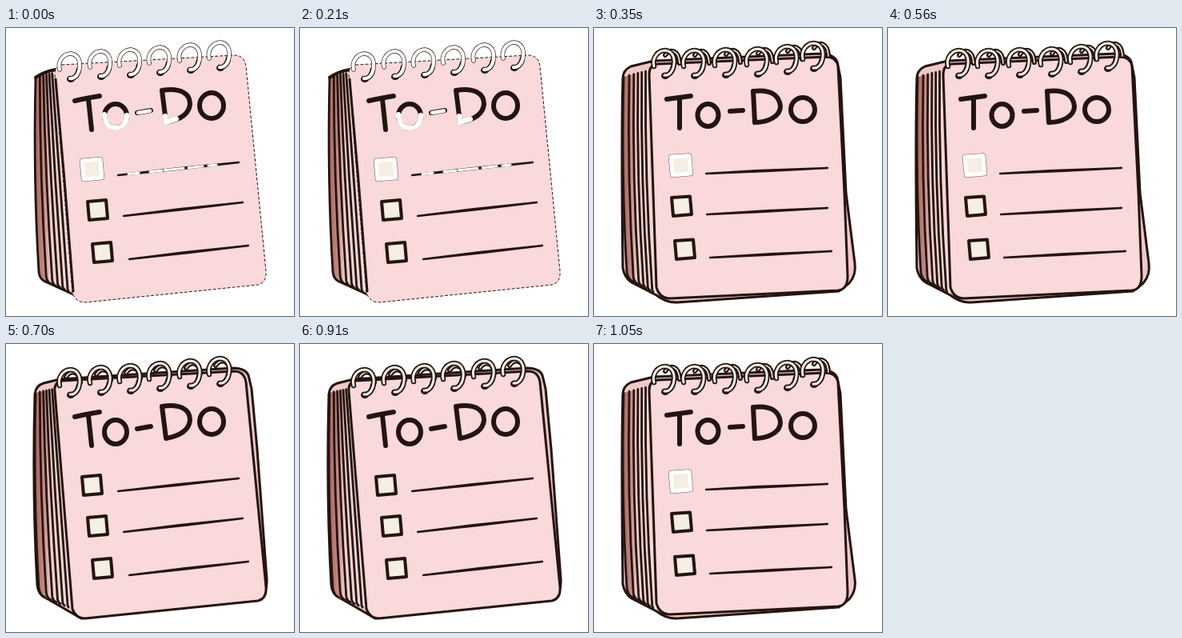
Animation, 360 px wide and 360 px high, one loop 1.4 s. Source, as an HTML page:

```html
<!DOCTYPE html>
<html lang="en">
<head>
<meta charset="utf-8">
<title>To-Do pad</title>
<style>
  html, body { margin: 0; width: 100%; height: 100%; overflow: hidden; background: #fff; }
  svg { display: block; width: 100vw; height: 100vh; }
  path, ellipse { fill: none; stroke-linecap: round; stroke-linejoin: round; }
</style>
</head>
<body>
<svg id="stage" viewBox="0 0 360 360" role="img" aria-label="To-Do">
  <defs>
    <linearGradient id="pages">
      <stop offset="0" stop-color="#a9655f"/>
      <stop offset=".25" stop-color="#c58a85"/>
      <stop offset=".42" stop-color="#f0cfcb"/>
      <stop offset="1" stop-color="#f8dcd8"/>
    </linearGradient>
  </defs>
</svg>
<script>
const INK = '#24140e', PINK = '#f9d9da', CREAM = '#f5eee2', WHITE = '#fff';
const STEP = 350, ORDER = [0, 1, 2, 1];
const stage = document.getElementById('stage');

function add(parent, tag, attrs) {
  const node = document.createElementNS('http://www.w3.org/2000/svg', tag);
  for (const key in attrs) node.setAttribute(key, attrs[key]);
  parent.append(node);
  return node;
}
const line = (g, d, width = 3, stroke = INK, fill = 'none') =>
  add(g, 'path', { d, stroke, 'stroke-width': width, style: `fill:${fill}` });

const tilted = {
  body: 'M36 63Q37 52 47 49L67 44L283 30Q299 30 303 39L307 56L314 132L326 294Q327 310 317 319L94 343L49 317Q40 313 39 301C35 230 34 140 36 63Z',
  page: 'M70 46L285 34Q298 34 300 48L325 304Q326 318 315 321L99 343Q87 343 83 331L61 59Q60 48 70 46Z',
  edge: [61, 56, 72, 190, 83, 331],
  rings: [[79, 46], [117, 43], [154, 41], [191, 38], [229, 35], [266, 32]],
  wire: [4, 1],
  letters: ['M86 91Q99 88 117 85', 'M103 89L107 127', 'M164 106L181 103',
            'M195 78L200 118M195 78C218 74 230 82 230 95C229 108 216 115 200 118'],
  os: [[137, 110, 14, 15], [257, 97, 15, 16]],
  boxes: [[95, 166], [102, 217], [108, 270]], boxTilt: -2,
  rules: [[140, 184, 291, 168], [147, 235, 296, 218], [154, 289, 303, 272]]
};
const upright = {
  body: 'M36 63Q36 53 46 48L75 41L284 32Q300 33 304 42L308 62L315 206L326 294Q328 309 319 319L306 329L104 343Q91 344 78 334L47 318Q38 312 36 300C35 220 34 140 36 63Z',
  page: 'M80 45L290 36Q303 36 305 48L313 206L317 310Q317 327 305 328L95 338Q82 338 78 324L69 58Q69 46 80 45Z',
  edge: [69, 53, 68, 190, 78, 332],
  rings: [[87, 42], [124, 42], [163, 41], [203, 40], [240, 37], [273, 33]],
  wire: [10, -2],
  letters: ['M91 89Q106 87 121 85', 'M107 88L107 125', 'M170 104L186 103',
            'M199 79L201 118M199 79C222 76 232 85 233 98C233 110 218 118 201 118'],
  os: [[142.5, 109, 13, 14], [261, 102, 15, 15]],
  boxes: [[96, 161], [97, 212], [101, 266]], boxTilt: -1.5,
  rules: [[140, 182, 292, 175], [141, 233, 292, 225], [145, 287, 297, 279]]
};

function drawStack(g, pose) {
  const [x0, y0, x1, y1, x2, y2] = pose.edge;
  const mix = (a, b, k) => a + (b - a) * k;
  const leaf = k => `M${mix(37, x0, k)} ${mix(61, y0, k)}` +
    `Q${mix(34, x1, k)} ${mix(190, y1, k)} ${mix(41, x2, k)} ${mix(305, y2, k)}` +
    `q1 ${9 * (1 - k)} ${8 * (1 - k)} ${12 * (1 - k)}`;
  add(g, 'path', { d: `${leaf(0)}L${x2} ${y2}Q${x1} ${y1} ${x0} ${y0}Z`, style: 'fill:url(#pages)' });
  for (const k of [0, .22, .4, .56, .71, .86]) line(g, leaf(k), 2.8);
}

function drawRing(g, [x, y], [wireX, wireY], faded) {
  const ring = add(g, 'g', { transform: `translate(${x} ${y})` });
  const arch = 'M-12 6C-15 -6 -6 -14 2 -14C11 -13 14 -5 13 3C12 12 7 18 1 17';
  add(ring, 'ellipse', { cx: 2, cy: 18, rx: 5, ry: 4, style: `fill:${INK}` });
  if (!faded) {
    const wire = `M${wireX - 8} ${wireY - 6}C${wireX - 2} ${wireY - 15} ${wireX + 9} ${wireY - 13} ${wireX + 10} 2`;
    line(ring, wire, 6);
    line(ring, wire, 1.6, CREAM);
  }
  line(ring, 'M12 6C11 13 6 18 1 17', 6.5);
  line(ring, arch, faded ? 5.5 : 6.5);
  line(ring, arch, faded ? 4.2 : 3, faded ? WHITE : CREAM);
}

function drawBox(g, [x, y], tilt, faded) {
  const d = `M${x} ${y}L${x + 23} ${y + tilt}L${x + 25} ${y + 21}L${x + 2} ${y + 23}Z`;
  if (faded) line(g, d, 6, '#66544c');
  line(g, d, faded ? 5 : 4, faded ? WHITE : INK, CREAM);
}

function drawRule(g, [x0, y0, x1, y1]) {
  const mx = (x0 + x1) / 2, my = (y0 + y1) / 2;
  line(g, `M${x0} ${y0}Q${mx} ${my - 1.5} ${x1} ${y1}Q${mx} ${my + 1} ${x0} ${y0}Z`, 2.3, INK, INK);
}

function drawPad(pose, { worn = false, paleBox = false } = {}) {
  const g = add(stage, 'g', { visibility: 'hidden' });
  if (!worn) line(g, pose.body, 3, INK, '#efc9c8');
  drawStack(g, pose);
  if (worn) {
    line(g, 'M37 62Q46 55 62 52', 4);
    line(g, 'M49 317L84 333', 3);
  }
  const page = line(g, pose.page, worn ? 1 : 3, INK, PINK);
  if (worn) {
    page.setAttribute('stroke-dasharray', '3 3');
    line(g, 'M62 64L73 190L84 329', 3);
  }
  pose.rings.forEach(p => drawRing(g, p, pose.wire, worn));
  pose.letters.forEach(d => line(g, d, 6));
  for (const [cx, cy, rx, ry] of pose.os)
    add(g, 'ellipse', { cx, cy, rx, ry, stroke: INK, 'stroke-width': 6 });
  pose.boxes.forEach((p, i) => drawBox(g, p, pose.boxTilt, paleBox && i === 0));
  pose.rules.forEach(r => drawRule(g, r));
  return g;
}

function bleach(g) {
  line(g, 'M123 108C123 119 129 125 137 125C146 125 151 118 151 109', 6.2, WHITE);
  line(g, 'M165 106L180 103.5', 4.5, WHITE);
  line(g, 'M199 110L200 118L213 114', 6.2, WHITE);
  for (const [from, to] of [[153, 166], [180, 195], [198, 222], [228, 246], [253, 263]]) {
    const at = x => `${x} ${184 - (x - 140) * 16 / 151}`;
    line(g, `M${at(from)}L${at(to)}`, 3, WHITE);
  }
  return g;
}

const views = [
  bleach(drawPad(tilted, { worn: true, paleBox: true })),
  drawPad(upright, { paleBox: true }),
  drawPad(tilted)
];

const begun = performance.now();
function render() {
  const elapsed = performance.now() - begun;
  const current = ORDER[Math.floor(elapsed / STEP) % ORDER.length];
  views.forEach((view, i) => view.setAttribute('visibility', i === current ? 'visible' : 'hidden'));
  requestAnimationFrame(render);
}
render();
</script>
</body>
</html>
```
